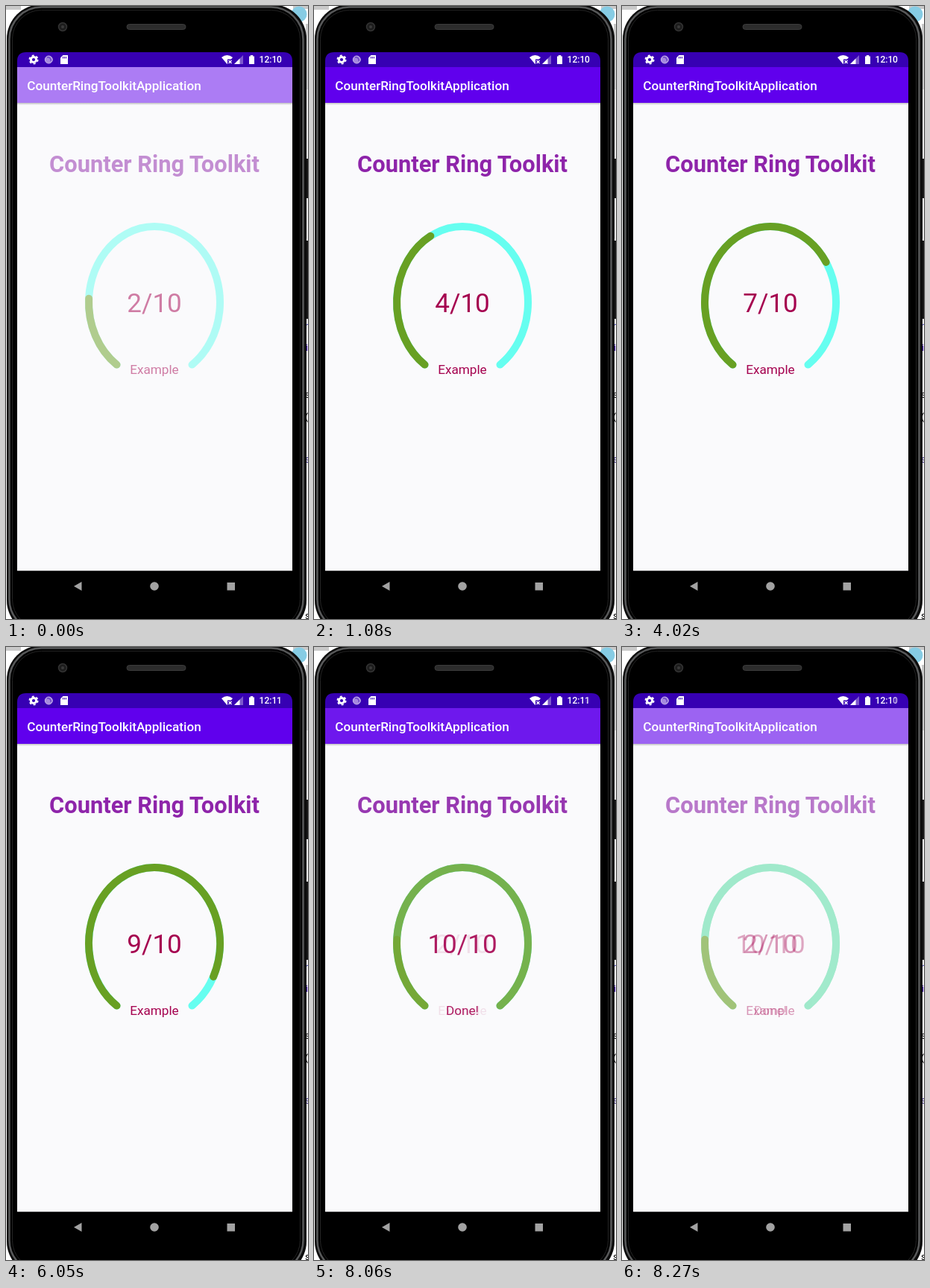
Animation of 405x823 px, one loop 8.34 s. Source, as an HTML page:

```html
<!DOCTYPE html>
<html lang="en">
<head>
<meta charset="utf-8">
<title>Gauge demo</title>
<style>
  html, body { margin: 0; width: 100%; height: 100%; overflow: hidden; background: #fff; }
  svg { display: block; width: 405px; height: 823px; font-family: Roboto, sans-serif; }
  .bar { fill: #6000ed; }
  .heading { font-size: 30.86px; font-weight: 700; fill: #8e24aa; }
  .count { font-size: 35px; }
  .label { font-size: 17.14px; }
  .count, .label { fill: #a5004f; }
  .heading, .count, .label { text-anchor: middle; }
  .track, .fill { fill: none; stroke-width: 10; stroke-linecap: round; }
  .track { stroke: #66fef0; }
  .fill { stroke: #68a023; }
  .appname { font-size: 17.14px; font-weight: 500; fill: #fff; }
  .clock { font-size: 12px; font-weight: 500; fill: #fff; }
  .scrap { font-size: 13px; }
</style>
</head>
<body>
<svg viewBox="0 0 405 823">
  <defs>
    <linearGradient id="shade" x2="0" y2="1">
      <stop stop-color="#bdbdc0"/><stop offset="1" stop-color="#fafafc"/>
    </linearGradient>
    <g id="scene">
      <rect class="bar" x="15" y="82" width="369" height="48"/>
      <text class="heading" x="199" y="223">Counter Ring Toolkit</text>
      <path class="track"/>
      <path class="fill"/>
      <text class="count" x="199" y="410.5"></text>
      <text class="label" x="199" y="493.5"></text>
    </g>
  </defs>

  <!-- desktop behind the phone -->
  <path fill="#c9c9c9" d="M0 0H20V5H0ZM385 0h20v4h-20zM402 24h3v88h-3z"/>
  <path fill="#e4e4e4" d="M402 112h3v200h-3z"/>
  <circle cx="393" cy="11" r="10.5" fill="#86cce4"/>
  <g class="scrap">
    <text x="401" y="434" fill="#3535a8">r</text>
    <text x="402" y="463" fill="#4a22b0">i</text>
    <text x="401" y="526">s</text>
    <text x="401" y="556">(</text>
    <text x="401" y="613" fill="#302080">s</text>
    <text x="401" y="823">s</text>
  </g>

  <!-- phone body -->
  <path d="M400 205h5v53h-5zM400 315h5v105h-5z" fill="#151515"/>
  <rect x="1" y="-2" width="402" height="846" rx="46" fill="#0c0c0c"/>
  <rect x="4.5" y="1.5" width="394" height="838" rx="43" stroke="#58595a" stroke-width="2.5"/>
  <rect x="8.5" y="5.5" width="386" height="830" rx="39" stroke="#242424"/>
  <circle cx="76" cy="28" r="5.5" fill="#1d1d1d" stroke="#333" stroke-width="1.5"/>
  <circle cx="76" cy="28" r="2" fill="#3a3a3a"/>
  <rect x="162" y="24.5" width="79" height="7" rx="3.5" fill="#2c2c2c" stroke="#3c3c3c"/>

  <!-- screen -->
  <path fill="#fafafc" d="M15 82H384V758.5H15Z"/>
  <path fill="#3700b3" d="M15 82V74Q15 62 27 62H372Q384 62 384 74V82Z"/>
  <rect x="15" y="130" width="369" height="3" fill="url(#shade)"/>

  <g id="last"></g>
  <g id="next"></g>

  <text class="appname" x="28.3" y="112.7">CounterRingToolkitApplication</text>

  <!-- status icons -->
  <circle cx="37" cy="72" r="3.6" fill="none" stroke="#fff" stroke-width="3"/>
  <circle cx="37" cy="72" r="5.6" fill="none" stroke="#fff" stroke-width="1.8" stroke-dasharray="2.93"/>
  <circle cx="57.3" cy="72" r="5" fill="#a58ade" stroke="#c9b8ec"/>
  <path fill="none" stroke="#6f48c9" stroke-width="1.5" d="M55 69a4 4 0 0 1 5 5"/>
  <path fill="#fff" d="M76.5 66H83V78H73V69.5Z"/>
  <path stroke="#3700b3" d="M76.5 68v2.5M78.5 68v2.5M80.5 68v2.5"/>
  <path fill="#fff" d="M289 69Q296.500 63 304 69L296.500 78Z"/>
  <path fill="#3700b3" d="M297 71.500h7v7h-7z"/>
  <path stroke="#fff" stroke-width="1.4" d="M298.500 73l4 4m0-4l-4 4"/>
  <path fill="#7c58cd" d="M306 78L318 66V78Z"/>
  <path fill="#fff" d="M306 78L313.500 70.500V78ZM326 67.500h1.800V66h3.400v1.500H333V78H326Z"/>
  <text class="clock" x="339.600" y="76.300">12:1</text>
  <text class="clock" id="minute0" x="363.100" y="76.300">0</text>
  <text class="clock" id="minute1" x="363.100" y="76.300">1</text>

  <!-- navigation -->
  <path d="M15 758.500H384V800H15Z"/>
  <g fill="#a2a2a2">
    <path d="M91 779L101.500 773V785Z"/>
    <circle cx="199" cy="779" r="5.800"/>
    <rect x="296.500" y="774" width="10.500" height="10.500"/>
  </g>
</svg>
<script>
  const LOOP = 8340;
  const STEPS = [[0, 2], [1080, 4], [2080, 5], [3100, 6], [4020, 7], [5030, 8], [6050, 9], [7060, 10]];
  const FADE = [8060, 8130, 8200, 8270];
  const $ = id => document.getElementById(id);

  function point(value) {
    const a = (125 + 29 * value) * Math.PI / 180;
    return `${199 + 88 * Math.cos(a)} ${398 + 102 * Math.sin(a)}`;
  }

  const arc = value =>
    `M${point(0)}A88 102 0 ${value * 29 > 180 ? 1 : 0} 1 ${point(value)}`;

  function makeScene(id) {
    const root = $(id);
    for (const part of $('scene').children) root.append(part.cloneNode(true));
    root.querySelector('.track').setAttribute('d', arc(10));
    return value => {
      root.querySelector('.fill').setAttribute('d', arc(value));
      root.querySelector('.count').textContent = value + '/10';
      root.querySelector('.label').textContent = value < 10 ? 'Example' : 'Done!';
    };
  }

  const setLast = makeScene('last');
  const setNext = makeScene('next');
  setLast(10);

  function draw() {
    const t = performance.now() % LOOP;
    const stage = FADE.filter(start => t >= start).length;
    let next = 1, last = 0, late = t >= 5030 ? 1 : 0;
    if (stage) {
      next = stage * 0.1;
      last = 1 - stage * 0.2;
      late = last / (last + next);
    } else if (t < 80) {
      next = 0.5;
    }
    setNext(stage ? 2 : STEPS.findLast(([start]) => t >= start)[1]);
    $('next').setAttribute('opacity', next);
    // the lower layer is raised to make up for the layer covering it
    $('last').setAttribute('opacity', last ? last / (1 - next) : 0);
    $('minute0').setAttribute('opacity', 1 - late);
    $('minute1').setAttribute('opacity', late);
    requestAnimationFrame(draw);
  }
  draw();
</script>
</body>
</html>
```
